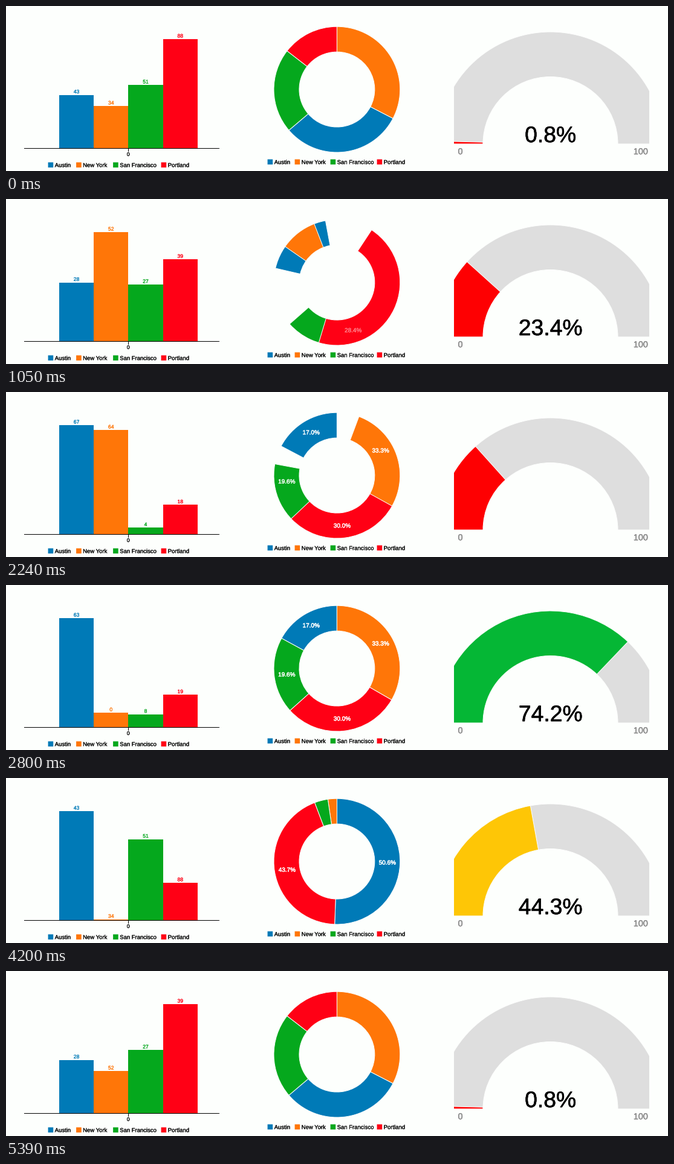
Recreate the animation shown at these times as a matplotlib script. Size 1095 by 274 pixels, loop 5460 ms.

```python
import numpy as np
import matplotlib.pyplot as plt
from matplotlib.animation import FuncAnimation
from matplotlib.colors import to_rgb
from matplotlib.patches import Rectangle, Wedge
from matplotlib.patheffects import withStroke

W, H, DPI = 1095, 274, 64
PT = 72 / DPI                      # points per pixel
STEP, LOOP, MOVE = 70, 5460, 350   # ms
PAPER = "#fdfffd"

CITIES = ["Austin", "New York", "San Francisco", "Portland"]
COLORS = ["#007ab7", "#ff7608", "#05a81d", "#ff0015"]
RED, YELLOW, GREEN = "#fe0002", "#fec606", "#05b735"

BAR_DATA = [(43, 34, 51, 88), (28, 52, 27, 39), (67, 64, 4, 18),
            (63, 0, 8, 19), (140, 1, 104, 48)]
RING_DATA = [(43, 45, 30, 20), (13, 3, 18, 38), (26, 29, 41, 38),
             (46, 90, 53, 81), (44, 2, 3, 38)]
DIAL_DATA = [(0.8, RED), (23.4, RED), (26.8, RED), (74.2, GREEN), (44.3, YELLOW)]

# Times at which each chart starts to move to its next state
BAR_STARTS = (115, 1471, 2564, 3440, 4200, 5390)
RING_STARTS = (0, 902, 1991, 3110, 4520, 5390)
DIAL_STARTS = range(20, LOOP, 1110)

BASE, BAR_MAX, BAR_X, BAR_W = 236, 181, 88, 57.2
RING, RING_R, RING_HOLE = (547.4, 138.6), 104.4, 62.4
DIAL, DIAL_R, DIAL_HOLE = (900.5, 229), 186, 111.5


def label(x, y, text, px, color="black", ha="center", z=20, weight=0.15):
    """Text whose capitals are centred on y, thickened by weight pixels."""
    return ax.text(x, y + 0.36 * px, text, size=px * PT, color=color, ha=ha,
                   va="baseline", family="Liberation Sans", zorder=z,
                   path_effects=[withStroke(linewidth=weight * PT, foreground=color)])


def box(x, y, w, h, color, snap=None):
    return ax.add_patch(Rectangle((x, y), w, h, fc=color, lw=0, snap=snap))


def sector(center, r, hole, color, z):
    return ax.add_patch(Wedge(center, r, 180, 360, width=r - hole, fc=color,
                              ec=PAPER, lw=PT, zorder=z))


def legend(xs, y):
    for x, city, color in zip(xs, CITIES, COLORS):
        box(x - 0.4, y - 4.4, 8.6, 8.6, color, snap=False)
        label(x + 10.7, y, city, 9.5, ha="left")


def ease(u):
    u = min(max(u, 0), 1)
    return 4 * u ** 3 if u < 0.5 else 1 - 4 * (1 - u) ** 3


def phase(t, starts):
    """Previous state, next state and progress between them."""
    begun = [s for s in starts if s <= t]
    if not begun:
        return 0, 0, 1
    k = len(begun)
    return (k - 1) % 5, k % 5, ease((t - begun[-1]) / MOVE)


def mix(a, b, p):
    return np.asarray(a) * (1 - p) + np.asarray(b) * p


def heights(k):
    v = np.array(BAR_DATA[k], float)
    return v / v.max() * BAR_MAX


def spans(k):
    """Start and end angle of each slice, largest slice first."""
    v = np.array(RING_DATA[k], float)
    order = np.argsort(-v)
    ends = np.empty(4)
    ends[order] = np.cumsum(v[order])
    return np.column_stack([ends - v, ends]) * 360 / v.sum()


fig = plt.figure(figsize=(W / DPI, H / DPI), dpi=DPI, facecolor=PAPER)
ax = fig.add_axes([0, 0, 1, 1])
ax.set_xlim(0, W)
ax.set_ylim(H, 0)
ax.axis("off")

# Bar chart
bars = [box(BAR_X + i * BAR_W, BASE, BAR_W, 0, c) for i, c in enumerate(COLORS)]
bar_text = [label(BAR_X + (i + 0.5) * BAR_W, 0, "", 8.6, c) for i, c in enumerate(COLORS)]
box(30, BASE, 323, 1, "black")
box(202, BASE, 1, 6, "black")
label(202.3, 246, "0", 8.6)
legend((70, 116.5, 177.5, 257), 264)

# Donut: each slice covers the label of the slice before it
slices = [sector(RING, RING_R, RING_HOLE, c, 2 + 2 * i) for i, c in enumerate(COLORS)]
slice_text = [label(0, 0, "", 10, "white", z=3 + 2 * i, weight=0.45) for i in range(4)]
legend((433, 478, 537, 614), 259)

# Gauge
window = Rectangle((741, 229), 323, -229, transform=ax.transData)
track = sector(DIAL, DIAL_R, DIAL_HOLE, "#dedede", 2)
needle = sector(DIAL, DIAL_R, DIAL_HOLE, RED, 3)
for part in (track, needle):
    part.set_clip_path(window)
dial_text = label(900.7, 212.7, "", 37.3, weight=0.6)
label(751.5, 241, "0", 14.4, "#8c8c8c", weight=0.4)
label(1049.8, 241, "100", 14.4, "#8c8c8c", weight=0.4)


def draw_bars(t):
    a, b, p = phase(t, BAR_STARTS)
    for bar, text, h, value in zip(bars, bar_text, mix(heights(a), heights(b), p), BAR_DATA[b]):
        bar.set(y=BASE - h, height=h)
        text.set_text(str(value))
        text.set_y(BASE - h - 2.5)


def draw_ring(t):
    a, b, p = phase(t, RING_STARTS)
    goal = spans(b)
    for part, text, now, end in zip(slices, slice_text, mix(spans(a), goal, p), goal):
        part.set(theta1=now[0] - 90, theta2=now[1] - 90)
        share = (end[1] - end[0]) / 360
        mid = np.radians(end.mean())
        text.set_position((RING[0] + 0.8 * RING_R * np.sin(mid),
                           RING[1] - 0.8 * RING_R * np.cos(mid) + 3.6))
        text.set_text(f"{share:.1%}")
        text.set_alpha(p if share >= 0.05 else 0)


def draw_dial(t):
    a, b, p = phase(t, DIAL_STARTS)
    (v0, c0), (v1, c1) = DIAL_DATA[a], DIAL_DATA[b]
    needle.set_theta2(180 + 1.8 * mix(v0, v1, p))
    needle.set_facecolor(mix(to_rgb(c0), to_rgb(c1), p))
    dial_text.set_text(f"{v1}%")
    dial_text.set_alpha(p)


def draw(frame):
    t = frame * STEP
    draw_bars(t)
    draw_ring(t)
    draw_dial(t)
    return []


anim = FuncAnimation(fig, draw, frames=LOOP // STEP, interval=STEP,
                     init_func=lambda: draw(0), repeat=True, repeat_delay=0)
plt.show()
```
